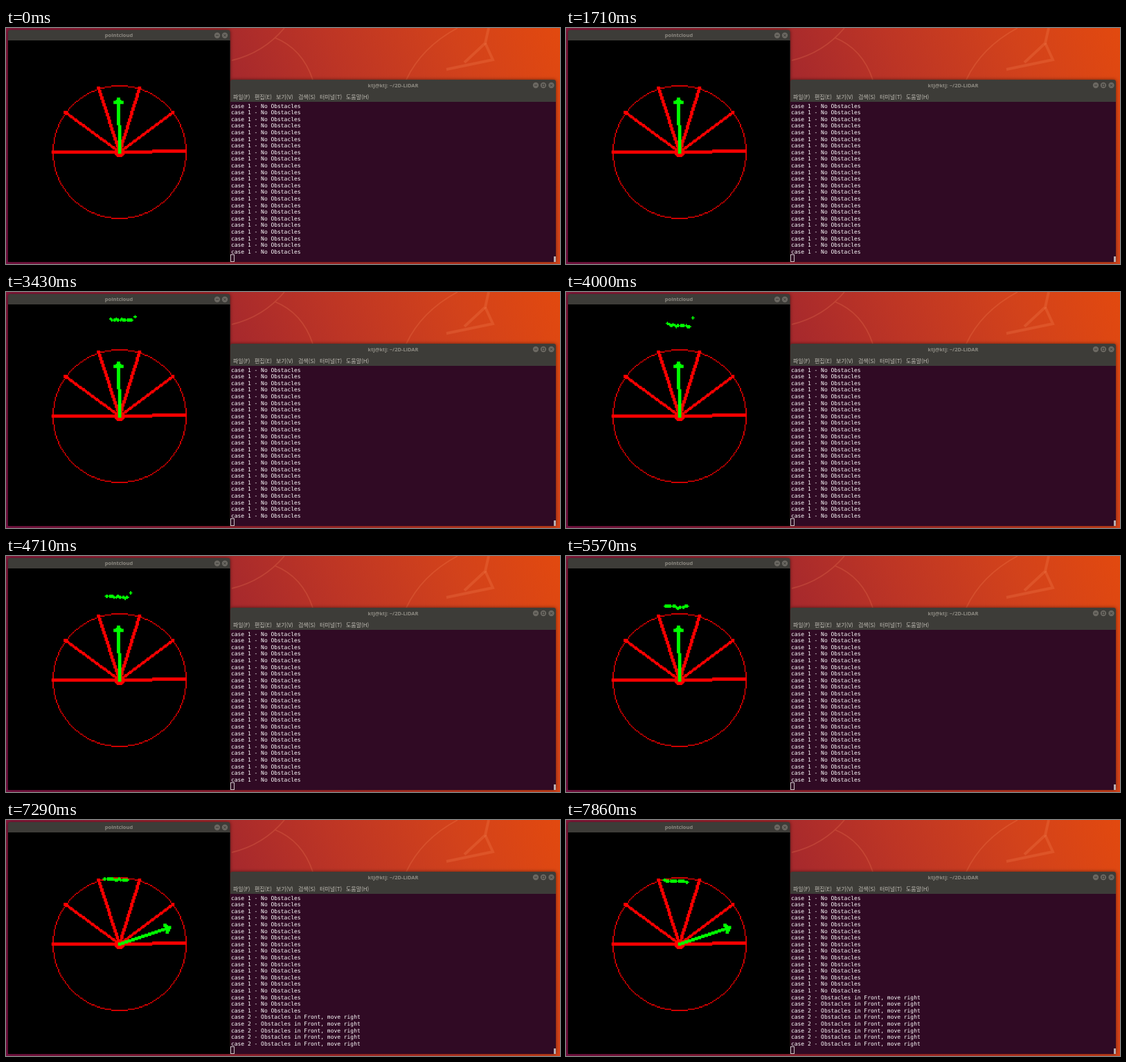
An HTML page with a canvas that plays this animation: 800 by 342 pixels, repeating every 8000 ms.

```html
<!DOCTYPE html>
<html lang="ko">
<head>
<meta charset="utf-8">
<title>pointcloud</title>
<style>
  html, body { margin: 0; width: 100%; height: 100%; overflow: hidden; background: #a82a2c; }
  canvas { display: block; }
</style>
</head>
<body>
<canvas id="stage" width="800" height="342"></canvas>
<script>
const LOOP = 8000;
const SCAN_MS = 215;        // one lidar sweep
const BLOCKED_AT = 6290;    // first sweep with the obstacle inside the circle
const ROWS = 23, ROW_H = 9.6;
const RED = '#ff0000', GREEN = '#00ff00';
const BAR = '#3d3c38', DIM = '#8d8a82';

const ctx = document.getElementById('stage').getContext('2d');

// The plot is a 200 x 200 grid, drawn large and scaled down to 320 px.
const GRID = 200, CELL = 4;
const PLOT = { x: 3.3, y: 19.1, size: 320 };
const plot = document.createElement('canvas');
plot.width = plot.height = GRID * CELL;
const pc = plot.getContext('2d');

// Obstacle outlines by sweep number: left end, spacing and heights in stage px.
const clouds = [
  { n: -18, x: 157, dx: 3.6, ys: [24, 25, 23, 25, 23, 24, 25, 24, 25, 26] },
  { n: -17, x: 156.5, dx: 3.6, ys: [32, 33, 31, 33, 31, 32, 33, 31, 33, 34] },
  { n: -11, x: 147, dx: 4, ys: [46, 49, 47, 50, 48, 49, 48, 50, 51, 38] },
  { n: -4, x: 143, dx: 3.6, ys: [72, 73, 72, 72, 73, 76, 75, 74, 73, 73] },
  { n: 1, x: 143, dx: 3.7, ys: [83, 84, 84, 84, 85, 86, 85, 85, 85, 85] },
  { n: 7, x: 141.5, dx: 3.7, ys: [87, 88, 88, 88, 89, 89, 88, 89, 89, 90] }
];

const lerp = (a, b, k) => a + (b - a) * k;
const noise = n => {
  const v = Math.sin(n * 12.9898) * 43758.5453;
  return v - Math.floor(v) - 0.5;
};

function dot(x, y) {
  pc.fillRect(x * CELL, y * CELL, CELL, CELL);
}

function plus(x, y) {
  pc.fillRect((x - 1) * CELL, y * CELL, 3 * CELL, CELL);
  pc.fillRect(x * CELL, (y - 1) * CELL, CELL, 3 * CELL);
}

function disk(cx, cy, r) {
  for (let y = -r; y <= r; y++) {
    for (let x = -r; x <= r; x++) if (x * x + y * y <= r * r + r) dot(cx + x, cy + y);
  }
}

function line(x0, y0, x1, y1) {
  const steps = Math.max(Math.abs(x1 - x0), Math.abs(y1 - y0), 1);
  for (let i = 0; i <= steps; i++) {
    plus(Math.round(lerp(x0, x1, i / steps)), Math.round(lerp(y0, y1, i / steps)));
  }
  disk(x0, y0, 1);
  disk(x1, y1, 1);
}

function ring(cx, cy, r) {
  for (let i = 0; i <= r * 0.7072; i++) {
    const j = Math.round(Math.sqrt(r * r - i * i));
    for (const [a, b] of [[i, j], [j, i]]) {
      for (const sx of [-1, 1]) for (const sy of [-1, 1]) dot(cx + sx * a, cy + sy * b);
    }
  }
}

function polar(deg, r) {
  const a = deg * Math.PI / 180;
  return [Math.floor(100 + r * Math.cos(a)), Math.floor(100 - r * Math.sin(a))];
}

function arrow(deg) {
  const [tx, ty] = polar(deg, 48);
  line(100, 100, tx, ty);
  for (const turn of [135, 225]) {
    const a = (deg + turn) * Math.PI / 180;
    line(tx, ty, Math.round(tx + 4.8 * Math.cos(a)), Math.round(ty - 4.8 * Math.sin(a)));
  }
}

function drawCloud(scan) {
  if (scan < clouds[0].n) return;
  let i = 0;
  while (i < clouds.length - 2 && scan >= clouds[i + 1].n) i++;
  const a = clouds[i], b = clouds[i + 1];
  const k = Math.min(1, (scan - a.n) / (b.n - a.n));
  const shake = k > 0 && k < 1 ? 2 : 0;
  const left = lerp(a.x, b.x, k), gap = lerp(a.dx, b.dx, k);
  const ys = a.ys.map((y, j) => lerp(y, b.ys[j], k) + shake * noise(scan * 17 + j));
  const mark = (j, y) => plus(
    Math.floor((left + j * gap - PLOT.x) / 1.6),
    Math.floor((y - PLOT.y) / 1.6)
  );
  ys.forEach((y, j) => {
    mark(j, y);
    const next = ys[j + 1];
    if (Math.abs(next - y) < 4) mark(j + 0.5, (y + next) / 2);
  });
}

function drawPlot(scan) {
  pc.fillStyle = '#000';
  pc.fillRect(0, 0, plot.width, plot.height);
  pc.fillStyle = '#e60000';
  ring(100, 100, 60);
  pc.fillStyle = RED;
  for (let deg = 0; deg < 180; deg += 36) line(100, 100, ...polar(deg + 0.01, 60));
  line(100, 100, 40, 100);
  disk(100, 100, 4);
  pc.fillStyle = GREEN;
  arrow(scan >= 0 ? 18 : 91);
  drawCloud(scan);
  ctx.fillStyle = '#000';
  ctx.fillRect(3, 18, 320.5, 321);
  ctx.imageSmoothingQuality = 'high';
  ctx.drawImage(plot, PLOT.x, PLOT.y, PLOT.size, PLOT.size);
}

function text(str, x, y, font, color, align = 'left') {
  ctx.font = font;
  ctx.fillStyle = color;
  ctx.textAlign = align;
  ctx.fillText(str, x, y);
}

function path(points, width, color) {
  ctx.beginPath();
  points.forEach(([x, y]) => ctx.lineTo(x, y));
  ctx.lineWidth = width;
  ctx.strokeStyle = color;
  ctx.stroke();
}

function drawDesktop() {
  const g = ctx.createLinearGradient(0, 342, 800, 0);
  g.addColorStop(0, '#7a1245');
  g.addColorStop(0.485, '#a82a2c');
  g.addColorStop(0.64, '#bd3525');
  g.addColorStop(0.83, '#d2421b');
  g.addColorStop(1, '#e2490f');
  ctx.fillStyle = g;
  ctx.fillRect(0, 0, 800, 342);

  const faint = 'rgba(255,150,100,0.2)';
  ctx.lineWidth = 1.8;
  ctx.strokeStyle = faint;
  ctx.beginPath();
  ctx.moveTo(326, 47);
  ctx.quadraticCurveTo(372, 36, 402, 0);
  ctx.moveTo(388, 14);
  ctx.quadraticCurveTo(428, 30, 443, 75);
  ctx.moveTo(578, 75);
  ctx.quadraticCurveTo(600, 28, 652, 0);
  ctx.stroke();
  path([[662, 50], [692, 22], [697, 0]], 4, faint);
  path([[692, 22], [703, 46], [636, 60]], 4, faint);
}

function button(x, y, kind) {
  ctx.fillStyle = '#6b6862';
  ctx.beginPath();
  ctx.arc(x, y, 4.2, 0, Math.PI * 2);
  ctx.fill();
  if (kind === 'min') path([[x - 2, y], [x + 2, y]], 1, BAR);
  if (kind === 'max') {
    ctx.lineWidth = 0.9;
    ctx.strokeStyle = BAR;
    ctx.strokeRect(x - 1.6, y - 1.6, 3.2, 3.2);
  }
  if (kind === 'close') {
    path([[x - 1.6, y - 1.6], [x + 1.6, y + 1.6]], 1, BAR);
    path([[x - 1.6, y + 1.6], [x + 1.6, y - 1.6]], 1, BAR);
  }
}

// Window body with a soft shadow around it.
function frame(x, y, w, h) {
  ctx.save();
  ctx.shadowColor = 'rgba(0,0,0,0.55)';
  ctx.shadowBlur = 5;
  ctx.fillStyle = BAR;
  ctx.beginPath();
  ctx.roundRect(x, y, w, h, [3, 3, 0, 0]);
  ctx.fill();
  ctx.restore();
}

const TITLE = 'bold 7.5px "Noto Sans", sans-serif';
const MENU = '8px "Noto Sans CJK KR", "Noto Sans CJK", sans-serif';
const MONO = '7.96px "DejaVu Sans Mono", monospace';

function drawPlotWindow(scan) {
  frame(3, 3, 320.5, 336);
  text('pointcloud', 163, 13.4, TITLE, DIM, 'center');
  button(305, 10.7, 'min');
  button(316, 10.7, 'close');
  drawPlot(scan);
}

const menu = [
  ['파일(F)', 328], ['편집(E)', 359], ['보기(V)', 390],
  ['검색(S)', 422], ['터미널(T)', 453], ['도움말(H)', 491]
];

function drawTerminal(scan) {
  frame(324, 75, 470, 264);
  text('ktj@ktj: ~/2D-LiDAR', 559, 86, TITLE, DIM, 'center');
  button(765, 83, 'min');
  button(776, 83, 'max');
  button(787.5, 83, 'close');
  for (const [label, x] of menu) text(label, x, 102.6, MENU, '#c2bfb7');

  ctx.fillStyle = '#300a24';
  ctx.fillRect(324, 107, 470, 232);
  const blocked = Math.max(0, scan + 1);
  for (let i = 0; i < ROWS; i++) {
    const msg = i < ROWS - blocked
      ? 'case 1 - No Obstacles'
      : 'case 2 - Obstacles in Front, move right';
    text(msg, 325, 115.6 + i * ROW_H, MONO, '#fff');
  }
  ctx.lineWidth = 1;
  ctx.strokeStyle = '#c8c0c5';
  ctx.strokeRect(324.5, 328.5, 5, 10);
  ctx.fillStyle = '#b5aeb2';
  ctx.fillRect(791, 331, 3, 8);
}

function draw() {
  const t = performance.now() % LOOP;
  const scan = Math.floor((t - BLOCKED_AT) / SCAN_MS);
  drawDesktop();
  drawPlotWindow(scan);
  drawTerminal(scan);
  requestAnimationFrame(draw);
}
draw();
</script>
</body>
</html>
```
